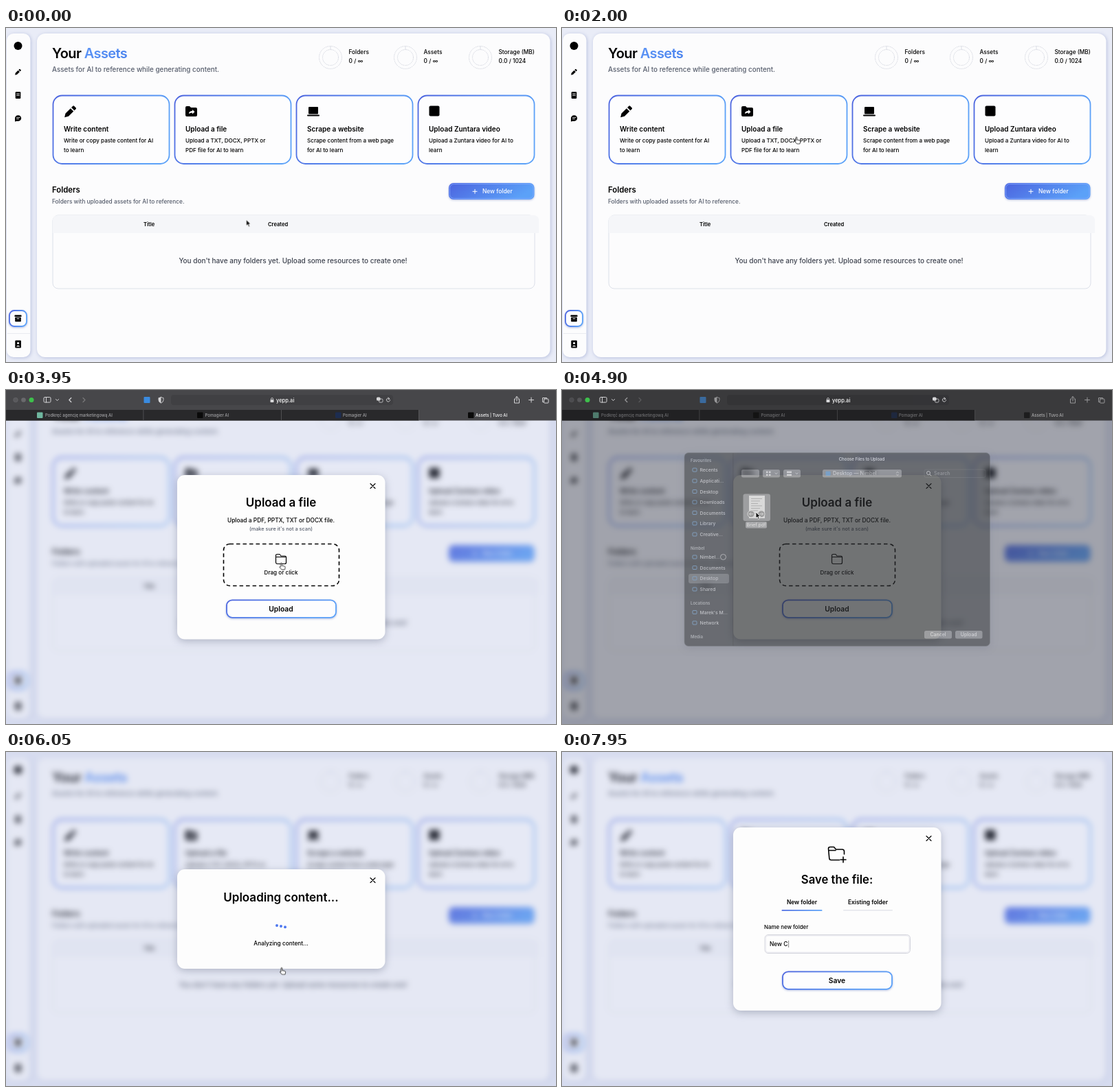
An HTML page that plays this animation: 800x487 px, repeating every 8 s.

```html
<!DOCTYPE html>
<html lang="en">
<head>
<meta charset="utf-8">
<title>Assets</title>
<style>
html, body { margin: 0; width: 100%; height: 100%; overflow: hidden; background: #dfe3f1; }
svg { display: block; width: 100vw; height: 100vh; font-family: Inter, "Open Sans", sans-serif; font-weight: 500; }
text { white-space: pre; }
.b { font-weight: 600; }
.m { text-anchor: middle; }
.muted { fill: #555c6b; }
.panel { fill: #fcfcfd; filter: drop-shadow(1.5px 1.5px 2.5px #b7bfdd); }
.dialog { transform-origin: 400px 243.5px; }
.box { fill: #fdfdfd; filter: drop-shadow(0 3px 6px #5f678066); }
.outlined { fill: #fdfdfe; stroke: url(#blue); stroke-width: 1.8; }
.raised { filter: drop-shadow(0 1.5px 1.5px #5872c077); }
.line { fill: none; stroke: currentColor; stroke-linecap: round; stroke-linejoin: round; }
#zone { transform-origin: 400px 255px; }
#toolbar { color: #d6d6d8; }
#hand, #arrow { fill: #111; stroke: #fff; stroke-width: .8; stroke-linejoin: round; }
#hand { fill: #fff; stroke: #111; }
</style>
</head>
<body>
<svg id="stage" viewBox="0 0 800 487" preserveAspectRatio="none"></svg>
<script>
const LOOP = 8000;
const $ = id => document.getElementById(id);

const text = (x, y, size, str, cls = "", attrs = "") =>
  `<text x="${x}" y="${y}" font-size="${size}" class="${cls}" ${attrs}>${str}</text>`;
const rect = (x, y, w, h, r = 0, attrs = "") =>
  `<rect x="${x}" y="${y}" width="${w}" height="${h}" rx="${r}" ${attrs}/>`;
const circle = (x, y, r, attrs = "") => `<circle cx="${x}" cy="${y}" r="${r}" ${attrs}/>`;
const line = (d, width = 1, attrs = "") => `<path class="line" d="${d}" stroke-width="${width}" ${attrs}/>`;
const at = (x, y, scale, body) => `<g transform="translate(${x} ${y}) scale(${scale})">${body}</g>`;

const pencil = '<path d="M1 15l1.2-5L8.600 3.600l3.800 3.800L6 13.800zM9.600 2.600L11.500.700q.8-.8 1.600 0l2.200 2.200q.8.8 0 1.600L13.400 6.400z"/>';
const fileFolder = '<path d="M0 2q0-2 2-2h4l2 2h7q2 0 2 2v9q0 2-2 2H2q-2 0-2-2z"/>' +
  '<path d="M5 11q0-4 5-4V5l3.500 3.300L10 11.500v-2q-3 0-5 1.500z" fill="#fff"/>';
const laptop = rect(2, 0, 14, 10.5, 1) + rect(0, 11.5, 18, 2, 1);
const plainSquare = rect(1, 0, 15, 15, 2);

const cards = [
  [68, "Write content", "Write or copy paste content for AI", "to learn", at(16, 15, 1.15, pencil)],
  [245, "Upload a file", "Upload a TXT, DOCX, PPTX or", "PDF file for AI to learn", at(16, 16, 1, fileFolder)],
  [422, "Scrape a website", "Scrape content from a web page", "for AI to learn", at(16, 17, 1, laptop)],
  [599, "Upload Zuntara video", "Upload a Zuntara video for AI to", "learn", at(15.5, 15.500, 1, plainSquare)],
].map(([x, title, a, b, icon]) => at(x, 98, 1,
  rect(.5, .5, 169, 99.500, 13, 'class="outlined"') + icon +
  text(16, 53, 10, title, "b") + text(16, 69, 8.100, a) + text(16, 83, 8.100, b))).join("");

const stats = [[472, "Folders", "0 / ∞"], [581, "Assets", "0 / ∞"], [690, "Storage (MB)", "0.0 / 1024"]]
  .map(([x, name, value]) =>
    circle(x, 43, 16.500, 'fill="none" stroke="#d3d6df" stroke-dasharray="1.500 1"') +
    circle(x, 43, 11.500, 'fill="none" stroke="#d3d6df" stroke-dasharray="1.500 1"') +
    line(`M${x} 27v4.500`, .8, 'color="#d3d6df"') +
    text(x + 26.500, 37.500, 8.300, name) + text(x + 26.500, 51, 8.400, value)).join("");

const sidebar = rect(1, 8, 34.500, 472, 10, 'class="panel"') +
  circle(17.500, 26, 6) + at(12.500, 59.500, .6, pencil) +
  rect(13.700, 93, 7.600, 10, 1.200) + line("M15.500 96h4M15.500 98.200h4", .9, 'color="#fff"') +
  '<path d="M13 136.500v-5a4.600 4.300 0 1 1 4.500 4.300h-2z"/>' +
  line("M15.500 130.500h4.500M15.500 132.500h3", .8, 'color="#fff"') +
  rect(5, 412, 25, 23, 7, 'class="outlined raised"') +
  rect(12.500, 418.500, 10, 2.600, .5) + rect(13.200, 421.800, 8.600, 6.400, .8) +
  line("M16 423.800h3", 1, 'color="#fff"') + rect(2, 445, 33, 1, 0, 'fill="#e9eaf0"') +
  rect(13.300, 455.500, 8.600, 11, 1.200) + circle(17.600, 459.500, 1.600, 'fill="#fff"') +
  '<path d="M14.800 464.500q2.800-3.500 5.600 0z" fill="#fff"/>';

const page = rect(-30, -30, 860, 547, 0, 'fill="#e9ecf7"') + sidebar +
  rect(45, 8, 746.500, 472, 12, 'class="panel"') +
  text(67, 43.500, 20, 'Your <tspan fill="url(#title)">Assets</tspan>', "b", 'letter-spacing="-.03em"') +
  text(67, 63.500, 9.900, "Assets for AI to reference while generating content.", "muted") + stats + cards +
  text(67, 239.500, 11.400, "Folders", "b") +
  text(67, 256, 8.300, "Folders with uploaded assets for AI to reference.", "muted") +
  rect(644, 226, 124.500, 24, 7, 'class="raised" fill="url(#blue)"') +
  rect(645.500, 227.500, 121.500, 21, 6, 'fill="none" stroke="#83aaff" stroke-width=".8"') +
  line("M679 238.300h6M682 235.300v6", 1, 'color="#fff"') +
  text(693, 241.300, 8.400, "New folder", "", 'fill="#fff"') +
  rect(68, 273, 701, 107, 8, 'fill="#fcfcfd" stroke="#d4d8e4" stroke-width=".8"') +
  '<path d="M68 299v-18q0-8 8-8h691q8 0 8 8v18z" fill="#f5f6f9"/>' +
  text(200, 289, 7.600, "Title", "b") + text(381, 289, 7.600, "Created", "b") +
  text(417.500, 343.300, 10, "You don't have any folders yet. Upload some resources to create one!", "m", 'fill="#3c414d"');

const dialog = (id, y, h, body) => `<g id="${id}" class="dialog">` +
  rect(249, y, 302.500, h, 11, 'class="box"') + line(`M530 ${y + 12.500}l7 7m0-7l-7 7`, 1.100) + body + "</g>";
const button = (y, label) => rect(321, y, 159, 25.500, 8, 'class="outlined raised"') +
  text(400, y + 16.500, 10.300, label, "b m");
const openFolder = '<path class="line" d="M1 3q0-2 2-2h3.500l2 2.500H14q2 0 2 2V13q0 2-2 2H3.200q-2 0-2.200-2zM1 5h15" stroke-width="1.200"/>';
const plusFolder = line("M17 20.500H5q-2.500 0-2.700-2.500L1 4q0-2.500 2.500-2.500H9l3 3.500h9q3 0 3 3v4", 1.600) +
  line("M1.500 6.500h10M22.500 16v8M18.500 20h8", 1.600);

const dialogs =
  dialog("upload", 124, 239.500,
    text(400, 170, 17, "Upload a file", "b m") +
    text(400, 193, 8.400, "Upload a PDF, PPTX, TXT or DOCX file.", "m") +
    text(400, 205, 7.300, "(make sure it's not a scan)", "m muted") +
    '<g id="zone">' + rect(316.500, 224.500, 168, 61, 9,
      'fill="none" stroke="currentColor" stroke-width="1.600" stroke-dasharray="5.500 4"') +
    at(391.500, 238.500, 1, openFolder) + text(400, 268.500, 8.100, "Drag or click", "m", 'fill="currentColor"') + "</g>" +
    button(306.300, "Upload")) +
  dialog("progress", 171, 145,
    text(400, 218, 17, "Uploading content...", "b m") +
    [0, 1, 2].map(i => circle(394 + 6 * i, 254.500, 2, `class="dot" fill="#5079ef"`)).join("") +
    text(400, 281.500, 8.300, "Analyzing content...", "m")) +
  dialog("save", 110, 267,
    at(386.500, 137, 1, plusFolder) + text(400, 192, 16.700, "Save the file:", "b m") +
    text(349, 222, 8.400, "New folder", "b m") + rect(319.500, 230, 59, 1.800, .9, 'fill="url(#blue)"') +
    text(445, 222, 8.400, "Existing folder", "b m") + rect(409, 230, 72, 1.500, .7, 'fill="#e4e5eb"') +
    text(294, 258.300, 7.900, "Name new folder") +
    rect(295, 266.500, 211.500, 27, 5, 'fill="#fdfdfd" stroke="#d3d4dc"') +
    rect(296.200, 267.800, 209, 24.500, 4, 'fill="none" stroke="#ececf1" stroke-width="1.500"') +
    text(302, 283.300, 8.400, "", "", 'id="typed"') +
    button(320.300, "Save"));

const places = [
  ["Favourites", 105], ["Recents", 119], ["Applicati…", 135], ["Desktop", 150.500], ["Downloads", 166],
  ["Documents", 181.500], ["Library", 197], ["Creative…", 213], ["Nimbel", 232.500], ["Nimbel…", 246],
  ["Documents", 261.500], ["Desktop", 277], ["Shared", 293], ["Locations", 313], ["Marek's M…", 326.500],
  ["Network", 342], ["Media", 361.500]];
const headings = ["Favourites", "Nimbel", "Locations", "Media"];
const placeList = places.map(([name, y]) => headings.includes(name)
  ? text(187, y, 6, name, "b", 'fill="#b9bbbd"')
  : rect(190, y - 5, 6, 5, 1, 'fill="none" stroke="#6aa3dc" stroke-width=".9"') +
    text(200.500, y, 6.800, name, "", 'fill="#dcdddf"')).join("");

const pill = (x, y, w, h, label = "") => rect(x, y, w, h, 2.500, 'fill="#8b8d90"') +
  text(x + w / 2, y + h / 2 + 2.500, 7, label, "m", 'fill="#fff"');
const sheet = '<g id="sheet">' +
  rect(178, 91.500, 444.500, 282, 6, 'class="box" style="fill:#35383b" stroke="#66696c" stroke-width=".7"') +
  rect(184, 268, 59, 14, 3, 'fill="#6b6e71"') + placeList + rect(248.500, 92, .8, 281, 0, 'fill="#222"') +
  circle(234.500, 243.500, 4, 'fill="none" stroke="#ddd" stroke-width=".8"') +
  text(436, 102.800, 6, "Choose Files to Upload", "b m", 'fill="#fff"') +
  pill(261, 116, 26, 11.500) + pill(292, 116, 25, 11.500) + pill(322, 116, 25, 11.500) +
  [0, 4].map(x => [0, 4].map(y => rect(297 + x, 118.500 + y, 2.500, 2.500, 0, 'fill="#fff"')).join("")).join("") +
  rect(327, 118.500, 7, 2.500, 0, 'fill="#fff"') + rect(327, 122.500, 7, 2.500, 0, 'fill="#fff"') +
  line("M310 121l1.500 1.500 1.500-1.500M340 121l1.500 1.500 1.500-1.500", .9, 'color="#fff"') +
  pill(379, 116, 115, 11.500) + rect(383.500, 118.500, 7, 6.500, 1, 'fill="#5ba3e6"') +
  text(394, 124.300, 7.200, "Desktop — Nimbel", "", 'fill="#fff"') +
  line("M486.500 120.800l1.500-1.500 1.500 1.500m0 2.200l-1.500 1.500-1.500-1.500", .8, 'color="#fff"') +
  rect(527, 116, 89, 11.500, 2.500, 'fill="none" stroke="#55585b" stroke-width=".7"') +
  circle(533, 121, 2.500, 'fill="none" stroke="#fff" stroke-width=".8"') + line("M535 123l2 2", .8, 'color="#fff"') +
  text(541, 124, 7, "Search", "", 'fill="#8e9194"') +
  rect(263.500, 151.500, 39.500, 39.500, 3, 'fill="#8d8f92"') + rect(272, 154, 23, 33, 0, 'fill="#fff"') +
  [0, 1, 2, 3, 4, 5, 6].map(i => rect(275, 158 + 3.500 * i, 16 - i % 3 * 3, .8, 0, 'fill="#999"')).join("") +
  [275, 290].map(x => circle(x, 180.800, 5, 'fill="#888" stroke="#fff" stroke-width=".9"')).join("") +
  line("M277.500 180.800h-5l2-2m-2 2l2 2M287.500 180.800h5l-2-2m2 2l-2 2", .9, 'color="#fff"') +
  rect(267, 192, 31, 9.500, 2, 'fill="#9a9c9f"') + text(282.500, 199.200, 6.800, "Brief.pdf", "m", 'fill="#fff"') +
  pill(527, 351, 40, 11.500, "Cancel") + pill(572, 351, 39.500, 11.500, "Upload") + "</g>";

const tabs = [
  [45, 57, "#6fb79f", "Podkręć agencję marketingową AI"], [278, 289.500, "#0a0a0a", "Pomagier AI"],
  [479, 490, "#1d2d50", "Pomagier AI"], [672, 683, "#0a0a0a", "Assets | Tuvo AI"],
].map(([x, tx, color, label], i) => rect(x, 32.500, 8.500, 8.500, 1, `fill="${color}"`) +
  text(tx, 39.300, 6, label, "", `fill="${i < 3 ? "#a3a3a6" : "#fff"}"`)).join("");

const toolbar = '<g id="toolbar">' +
  rect(0, 0, 800, 44.500, 0, 'fill="#47474a"') + rect(0, 29, 600, 15.500, 0, 'fill="#29292b"') +
  [199.500, 400, 600].map(x => rect(x, 29, .8, 15.500, 0, 'fill="#59595c"')).join("") +
  rect(240, 7, 323, 15, 4, 'fill="#404043"') +
  '<rect id="shade" width="800" height="44.500" opacity="0"/>' +
  '<g id="tools">' +
  circle(14, 14.500, 3.300, 'fill="#59595c" stroke="#6b6b6e" stroke-width=".6"') +
  circle(25.500, 14.500, 3.300, 'fill="#6a6a6d"') +
  line("M94.800 11.500l-3 3 3 3", 1.200) + line("M112 11.500l3 3-3 3", 1.200, 'opacity=".35"') +
  rect(200.500, 10, 9, 9, 1, 'fill="#3a8be0"') +
  line("M225.500 10.500q2 1 3.500 1v3q0 3-3.500 4.500-3.500-1.500-3.500-4.500v-3q1.500 0 3.500-1z", .9) +
  '<path d="M225.500 10.500q-2 1-3.500 1v3q0 3 3.500 4.500z" fill="#d6d6d8"/>' +
  line("M741 13h-1.500v6h7v-6H745M743 16V9.500l-2 2m2-2l2 2M760.500 14.500h7M764 11v7M781.500 17.500h-1v-6h6v1", 1) +
  rect(782.500, 13, 6.500, 6, 1, 'class="line" stroke-width="1"') + tabs + "</g>" +
  circle(37, 14.500, 3.500, 'fill="#3ec04c"') +
  rect(55, 10.500, 10, 7.500, 1.500, 'class="line" stroke-width="1"') +
  line("M58.500 10.500v7.500M72.500 13.500l2 2 2-2", 1) +
  rect(384.500, 14, 5, 4, .7, 'fill="#d6d6d8"') + line("M385.500 14v-1a1.500 1.500 0 0 1 3 0v1", .8) +
  text(393, 17.800, 7.500, "yepp.ai", "", 'fill="#fff"') +
  rect(539, 10.500, 5.500, 5, 1.500, 'fill="#d6d6d8"') + rect(542.500, 13, 5.500, 5, 1.500, 'class="line" stroke-width=".8"') +
  line("M558 12.800a2.600 2.600 0 1 0 .6 2M556 11l2 1.800-2 1", .9) + "</g>";

const cursor = '<g id="cursor"><path id="arrow" d="M0 0v9l2.100-1.900 1.500 3.300 1.600-.7-1.500-3.200h2.700z"/>' +
  '<path id="hand" d="M1 1q0-1 .9-1t.9 1v3.200q2.600 0 4.200 1 1 .6.500 2.500L6.800 10H2.600L-.3 6.800q-.5-1.200.5-1.300l.8.700z"/></g>';

const gradient = (id, x2, y2, from, to) => `<linearGradient id="${id}" x2="${x2}" y2="${y2}">` +
  `<stop stop-color="${from}"/><stop offset="1" stop-color="${to}"/></linearGradient>`;

$("stage").innerHTML = "<defs>" + gradient("blue", 1, .3, "#4c64df", "#5ba1f8") +
  '<linearGradient id="title" gradientUnits="userSpaceOnUse" x1="117" x2="180"><stop stop-color="#5b93f5"/><stop offset="1" stop-color="#4a83ee"/></linearGradient></defs>' +
  `<g id="page">${page}</g>` +
  '<rect id="veil" width="800" height="487" fill="#a0acd8"/>' + dialogs +
  '<rect id="dim" width="800" height="487"/>' + toolbar + sheet + cursor;

// Plays one property through [time in ms, value] steps, looping with the whole scene.
function play(id, prop, steps, easing = "linear") {
  const frames = steps.map(([ms, value]) => ({ offset: ms / LOOP, [prop]: value, easing }));
  frames.unshift({ ...frames[0], offset: 0 });
  frames.push({ ...frames.at(-1), offset: 1 });
  return $(id).animate(frames, { duration: LOOP, iterations: Infinity });
}
const fade = (id, ...steps) => play(id, "opacity", steps);
const flip = (id, ...steps) => play(id, "opacity", steps, "steps(1)");
const move = (x, y) => `translate(${x}px, ${y}px)`;
const pop = (y, scale) => `translate(0px, ${y}px) scale(${scale})`;

const clock = fade("veil", [2350, 0], [2530, .25]);
play("page", "filter", [[2350, "blur(0px)"], [2530, "blur(4.2px)"]]);

fade("upload", [2380, 0], [2550, .92], [2650, 1], [5650, 1], [5780, 0]);
play("upload", "transform", [[2400, pop(11, .95)], [2550, pop(4.5, .98)], [2700, pop(0, 1)]]);
play("zone", "color", [[3150, "#c3c9d8"], [3300, "#000000"]]);
play("zone", "transform", [[3150, "scale(1.05)"], [3300, "scale(1)"]]);

fade("progress", [5680, 0], [5830, 1], [6650, 1], [6780, 0]);
fade("save", [6680, 0], [6850, 1]);
for (const [id, start] of [["progress", 5680], ["save", 6680]])
  play(id, "transform", [[start, pop(8, .95)], [start + 220, pop(0, 1)]], "ease-out");

play("toolbar", "transform", [[3600, move(0, -46)], [3800, move(0, 0)], [4940, move(0, 0)], [5080, move(0, -46)]]);
fade("sheet", [4000, 0], [4180, 1], [4830, 1], [4900, .52], [5000, 0]);
fade("dim", [4000, 0], [4180, .38], [4830, .38], [4900, .3], [5040, 0]);
fade("shade", [4000, 0], [4180, .18], [4900, .18], [5040, 0]);
fade("tools", [4000, 1], [4180, .6], [4900, .6], [5040, 1]);

play("cursor", "transform", [
  [1250, move(349.5, 279.5)], [2050, move(339, 158)], [2700, move(339, 158)], [3350, move(398.5, 252)],
  [4300, move(398.5, 252)], [4700, move(282, 178)], [5100, move(282, 178)], [5500, move(399, 314.5)],
  [6900, move(399, 314.5)], [7200, move(390, 277)],
], "ease-in-out");
flip("cursor", [0, 1], [7400, 0]);
flip("hand", [0, 0], [1850, 1], [2400, 0], [3200, 1], [4150, 0], [5400, 1], [7100, 0]);
flip("arrow", [0, 1], [1850, 0], [2400, 1], [3200, 0], [4150, 1], [5400, 0], [7100, 1]);

const word = "New C";
const keyTimes = [7430, 7540, 7650, 7760, 7880];
const dots = document.querySelectorAll(".dot");

function tick() {
  const now = (clock.currentTime || 0) % LOOP;
  const count = keyTimes.filter(ms => now >= ms).length;
  const caret = now >= 7250 ? '<tspan font-weight="300">|</tspan>' : "";
  $("typed").innerHTML = word.slice(0, count) + caret;
  dots.forEach((dot, i) =>
    dot.setAttribute("cy", 254.5 + 3 * Math.sin(2 * Math.PI * (now - 6050) / 800 + (i - 1) * .35)));
  requestAnimationFrame(tick);
}
tick();
</script>
</body>
</html>
```
